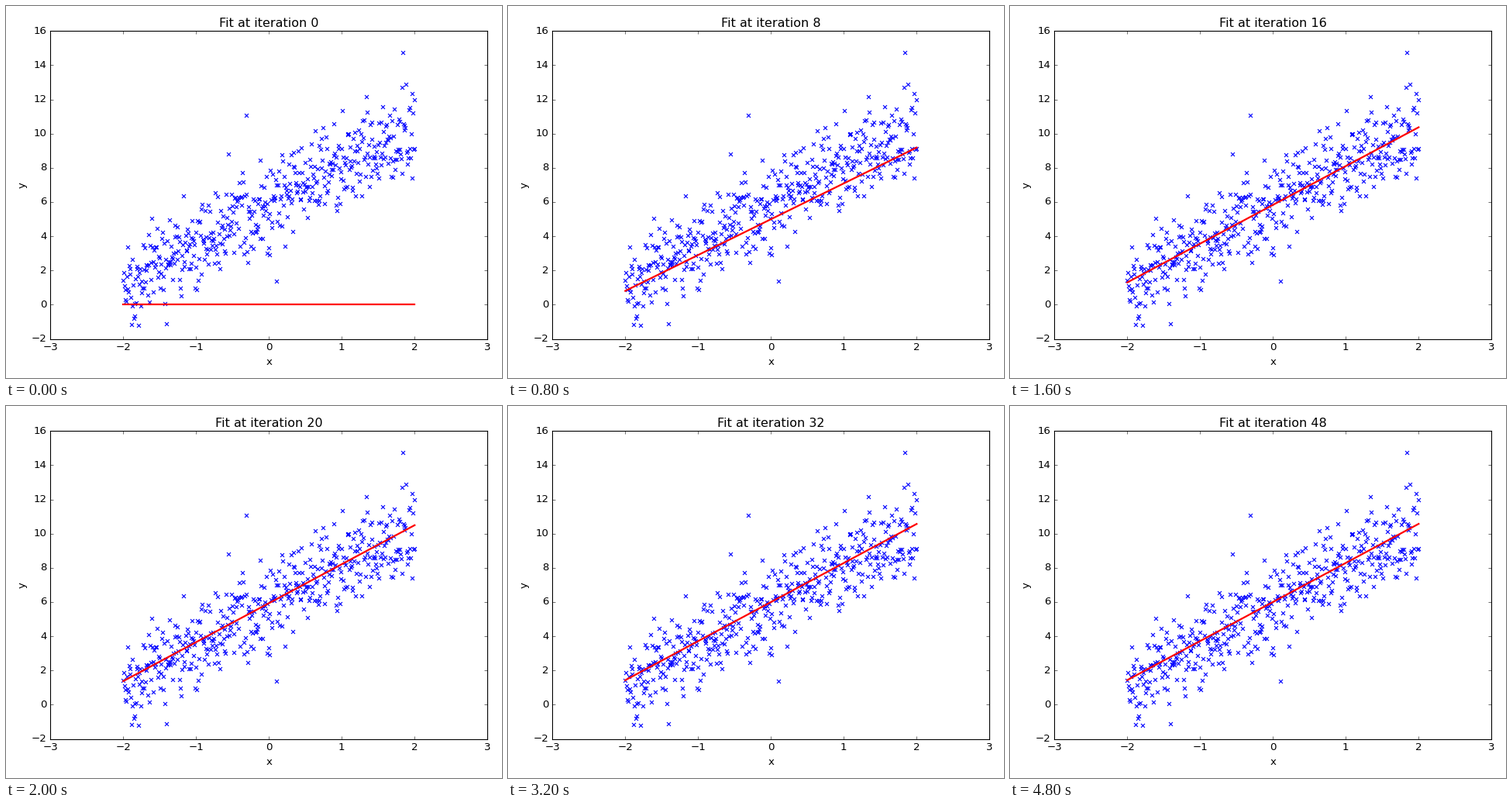
These frames come from a looping animation (640 px wide and 480 px high, 5 s). A matplotlib script:

```python
import numpy as np
import matplotlib.pyplot as plt
from matplotlib.animation import FuncAnimation

plt.style.use("classic")
plt.rcParams.update({"font.family": "DejaVu Sans", "savefig.dpi": "figure"})

WIDTH, HEIGHT, DPI = 640, 480, 80
LEFT, RIGHT, BOTTOM, TOP = 57.3, 621.3, 50.4, 447.8  # axes edges in pixels
FRAMES, INTERVAL, STEPS_PER_FRAME = 25, 200, 2
SLOPE, INTERCEPT, RATE = 2.283, 6.005, 0.1
COUNT, SPREAD, MAX_NOISE = 500, 1.35, 3.1
OUTLIERS = [(-1.89, -1.15), (-1.41, -1.1), (-0.56, 8.8),
            (-0.32, 11.05), (0.11, 1.38), (1.84, 14.72)]


def make_samples():
    x = np.linspace(-2, 2, COUNT)
    noise = np.random.default_rng(7).normal(0, SPREAD, COUNT)
    y = SLOPE * x + INTERCEPT + np.clip(noise, -MAX_NOISE, MAX_NOISE)
    for px, py in OUTLIERS:
        y[np.argmin(abs(x - px))] = py
    return x, y


def fit(iteration):
    """Closed form of gradient descent on the mean squared error."""
    intercept = INTERCEPT * (1 - (1 - 2 * RATE) ** iteration)
    slope = SLOPE * (1 - (1 - 2 * RATE * np.mean(x ** 2)) ** iteration)
    return slope, intercept


x, y = make_samples()
fig = plt.figure(figsize=(WIDTH / DPI, HEIGHT / DPI), dpi=DPI, facecolor="white")
ax = fig.add_axes([LEFT / WIDTH, BOTTOM / HEIGHT,
                   (RIGHT - LEFT) / WIDTH, (TOP - BOTTOM) / HEIGHT])
ax.scatter(x, y, s=20, c="b", marker="x", linewidths=1)
line, = ax.plot([-2, 2], [0, 0], "r-", linewidth=2)
ax.set(xlim=(-3, 3), ylim=(-2, 16), xlabel="x", ylabel="y",
       xticks=range(-3, 4), yticks=range(-2, 17, 2))
title = ax.set_title("Fit at iteration 0")


def update(frame):
    iteration = frame * STEPS_PER_FRAME
    slope, intercept = fit(iteration)
    line.set_ydata([intercept - 2 * slope, intercept + 2 * slope])
    title.set_text(f"Fit at iteration {iteration}")
    return line, title


anim = FuncAnimation(fig, update, frames=FRAMES, interval=INTERVAL,
                     repeat=True, repeat_delay=0, blit=False)
plt.show()
```
